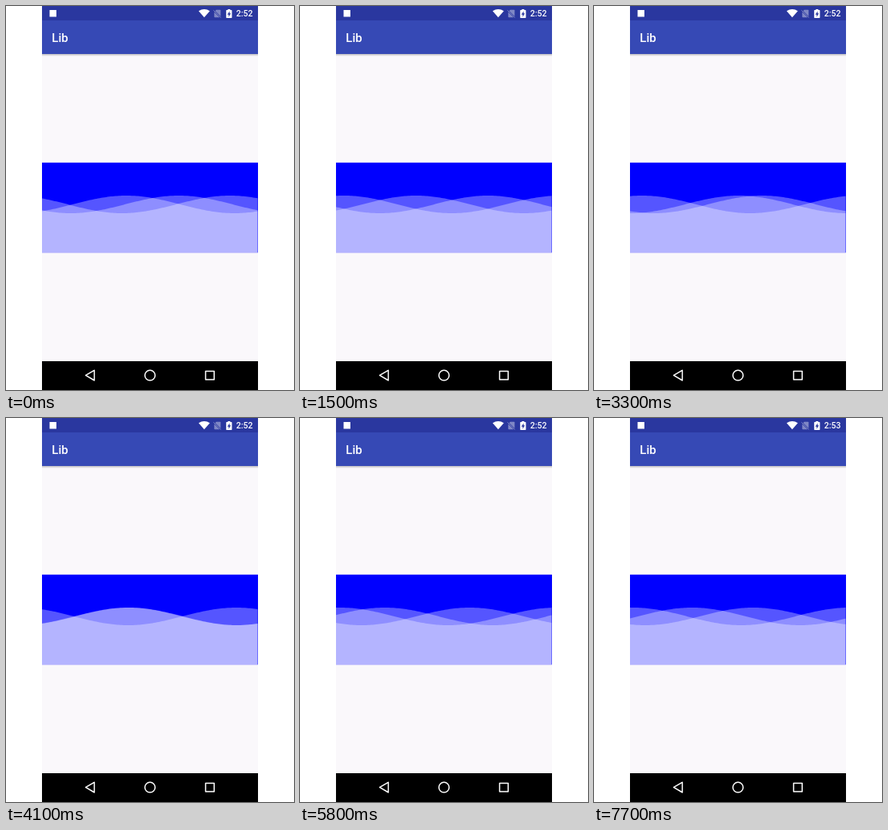
An HTML page that plays this animation: 360 px wide and 480 px high, repeating every 7.9 s.

```html
<!DOCTYPE html>
<html lang="en">
<head>
<meta charset="utf-8">
<title>Waves</title>
<style>
  html, body { margin: 0; width: 100%; height: 100%; overflow: hidden; background: #fff; }
  svg { display: block; width: 100vw; height: 100vh; }
  text { font-family: Roboto, "Noto Sans", sans-serif; font-weight: 500; fill: #fff; }
</style>
</head>
<body>
<svg viewBox="0 0 360 480">
  <defs>
    <linearGradient id="shade" x1="0" y1="0" x2="0" y2="1">
      <stop offset="0" stop-color="#000" stop-opacity=".24"/>
      <stop offset="1" stop-color="#000" stop-opacity="0"/>
    </linearGradient>
  </defs>

  <rect width="360" height="480" fill="#fff"/>
  <rect x="45" width="270" height="480" fill="#faf8fb"/>
  <rect x="45" width="270" height="18" fill="#2a379f"/>
  <rect x="45" y="18" width="270" height="42" fill="#3649b5"/>
  <rect x="45" y="60" width="270" height="3" fill="url(#shade)"/>
  <text x="57.3" y="45.3" font-size="15">Lib</text>

  <!-- status bar -->
  <rect x="54.5" y="5" width="8.5" height="8.5" fill="#fff"/>
  <path d="M247.8 14.3 L240.8 6.2 Q247.8 1.8 254.8 6.2 Z" fill="#fff"/>
  <g opacity=".4">
    <path d="M262.8 4.8 H267.5 Q268.3 4.8 268.3 5.6 V13.4 Q268.3 14.2 267.5 14.2 H261.1 Q260.3 14.2 260.3 13.4 V7.3 Z" fill="#fff"/>
    <path d="M259.6 5.6 L268.8 14.6" stroke="#2a379f" stroke-width="2"/>
    <path d="M259.4 5.4 L268.6 14.4" stroke="#fff" stroke-width="1"/>
  </g>
  <path d="M277.3 4 H280.3 V5.1 H281.8 Q282.4 5.1 282.4 5.7 V14.3 Q282.4 14.9 281.8 14.9 H275.8 Q275.2 14.9 275.2 14.3 V5.7 Q275.2 5.1 275.8 5.1 H277.3 Z" fill="#fff"/>
  <path d="M279.5 6.4 L276.7 10.7 H278.4 V13.7 L281 9.3 H279.5 Z" fill="#2a379f"/>
  <text id="clock" x="287.8" y="13.3" font-size="10.5">2:52</text>

  <rect x="45" y="195.75" width="270" height="112.5" fill="#00f"/>
  <g id="waves" fill="#fff" fill-opacity=".3333"></g>

  <!-- navigation bar -->
  <rect x="45" y="444" width="270" height="36" fill="#000"/>
  <g fill="none" stroke="#fff" stroke-width="1.5" stroke-linejoin="round">
    <path d="M99.6 461.7 L110.4 455.4 V468 Z"/>
    <circle cx="180" cy="461.7" r="6.4"/>
    <rect x="249.5" y="456.4" width="10.7" height="10.7"/>
  </g>
</svg>
<script>
  const LOOP = 7900, STEP = 100, PERIOD = 270;
  const LEFT = 45, RIGHT = 314.5, BOTTOM = 308.25, MID = 248, AMP = 11;
  const MINUTE_AT = 6200;

  // crest position at the start, speed in px per second
  const waves = [
    { crest: 150.5, speed: -63.8 },
    { crest: 216, speed: -47.2 },
    { crest: 280, speed: -30 }
  ];

  const group = document.getElementById("waves");
  const clock = document.getElementById("clock");
  for (const wave of waves) {
    wave.path = document.createElementNS("http://www.w3.org/2000/svg", "path");
    group.appendChild(wave.path);
  }

  function outline(crest) {
    let d = `M${LEFT} ${BOTTOM}`;
    for (let x = LEFT; x < RIGHT + 2; x += 2) {
      const px = Math.min(x, RIGHT);
      const y = MID - AMP * Math.cos(2 * Math.PI * (px - crest) / PERIOD);
      d += `L${px} ${y.toFixed(2)}`;
    }
    return d + `V${BOTTOM}Z`;
  }

  // the motion advances in steps, with two longer holds
  function stepTime(ms) {
    const t = Math.floor(ms / STEP) * STEP;
    if (t === 4100) return 4200;
    return Math.min(t, 7700);
  }

  function draw(ms) {
    const t = stepTime(ms);
    for (const { path, crest, speed } of waves) {
      path.setAttribute("d", outline(crest + speed * t / 1000));
    }
    clock.textContent = t < MINUTE_AT ? "2:52" : "2:53";
  }

  let start;
  function tick(now) {
    if (start === undefined) start = now;
    draw(Math.max(0, now - start) % LOOP);
    requestAnimationFrame(tick);
  }
  draw(0);
  requestAnimationFrame(tick);
</script>
</body>
</html>
```
